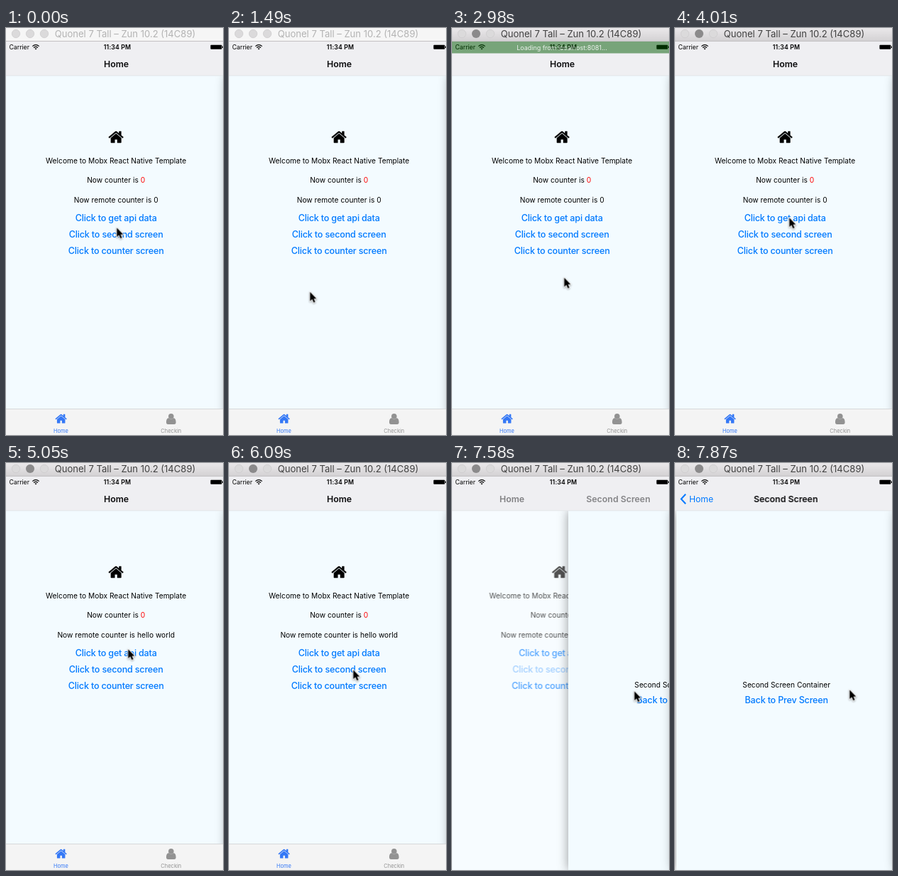
An HTML page that plays this animation: 306 by 571 pixels, repeating every 8000 ms.

```html
<!DOCTYPE html>
<html lang="en">
<head>
<meta charset="utf-8">
<title>Simulator demo</title>
<style>
html, body { margin: 0; width: 100%; height: 100%; overflow: hidden; background: #fefefe; }
svg { display: block; width: 100vw; height: 100vh; }
text { font-family: Inter, Roboto, "Liberation Sans", sans-serif; white-space: pre; }
.mid { text-anchor: middle; }
.body { font-size: 10.2px; letter-spacing: .002em; }
.link { font-size: 12.55px; font-weight: 500; letter-spacing: -.014em; fill: #007aff; }
.title { font-size: 12.35px; font-weight: 600; fill: #0b0b0d; }
.small { font-size: 8.7px; }
.tab { font-size: 7.4px; letter-spacing: .01em; }
.card { fill: #f3fbff; filter: drop-shadow(0 0 7.4px rgba(0, 0, 0, .4)); }
.arrow { filter: drop-shadow(0 1px 1px rgba(0, 0, 0, .35)); }

/* every change is a hard cut on a shared 8 s clock */
.a { animation: 8s step-end infinite; }
.window { animation-name: window; }
.focused { animation-name: focused; }
.app { animation-name: app; }
.banner { animation-name: banner; }
.reply0 { animation-name: reply0; }
.reply1 { animation-name: reply1; }
.press1 { animation-name: press1; }
.press2 { animation-name: press2; }
.home { animation-name: home; }
.second { animation-name: second; }
.tabs { animation-name: tabs; }
.home-title { animation-name: homeTitle; }
.second-title { animation-name: secondTitle; }
.back { animation-name: back; }
.cursor { animation-name: cursor; }

@keyframes window { 0% { color: #b3b3b3 } 22.36% { color: #414141 } }
@keyframes focused { 0% { opacity: 0 } 22.36% { opacity: 1 } }
@keyframes app { 0% { opacity: 1 } 29.74% { opacity: 0 } 35.36% { opacity: 1 } }
@keyframes banner { 0% { opacity: 0 } 29.74% { opacity: 1 } 37.2% { opacity: .5 } 39% { opacity: 0 } }
@keyframes reply0 { 0% { opacity: 1 } 61.36% { opacity: 0 } }
@keyframes reply1 { 0% { opacity: 0 } 61.36% { opacity: 1 } }
@keyframes press1 { 0% { opacity: 1 } 57.6% { opacity: .2 } 59.5% { opacity: .5 } 61.36% { opacity: .9 } 63.1% { opacity: 1 } }
@keyframes press2 { 0% { opacity: 1 } 92.86% { opacity: .2 } 94.74% { opacity: .5 } 96.6% { opacity: .9 } }
@keyframes home {
  0% { transform: none; opacity: 1 }
  94.74% { transform: translateX(-3.5px); opacity: .68 }
  96.6% { transform: translateX(-6.8px); opacity: .36 }
  98.36% { transform: translateX(-7.3px); opacity: .3 }
}
@keyframes second {
  0% { transform: translateX(340px) }
  94.74% { transform: translateX(164px) }
  96.6% { transform: translateX(25px) }
  98.36% { transform: translateX(2px) }
}
@keyframes tabs { 0% { opacity: 1 } 94.74% { opacity: 0 } }
@keyframes homeTitle {
  0% { transform: none; opacity: 1 }
  94.74% { transform: translateX(-71px); opacity: .48 }
  96.6% { transform: translateX(-140px); opacity: .08 }
  98.36% { transform: translateX(-152px); opacity: 0 }
}
@keyframes secondTitle {
  0% { transform: translateX(153px); opacity: 0 }
  94.74% { transform: translateX(79px); opacity: .46 }
  96.6% { transform: translateX(12px); opacity: .92 }
  98.36% { transform: translateX(.7px); opacity: 1 }
}
@keyframes back { 0% { opacity: 0 } 96.6% { opacity: .8 } 98.36% { opacity: 1 } }
@keyframes cursor {
  0% { transform: translate(156px, 280px) }
  1.87% { transform: translate(153px, 277px) }
  3.75% { transform: translate(152px, 275px) }
  13.12% { transform: translate(146px, 293px) }
  14.9% { transform: translate(130px, 330px) }
  16.74% { transform: translate(117px, 361px) }
  18.6% { transform: translate(114px, 370px) }
  22.36% { transform: translate(122px, 375px) }
  24.1% { transform: translate(149px, 390px) }
  26% { transform: translate(166px, 399px) }
  33.5% { transform: translate(166px, 391px) }
  35.36% { transform: translate(163px, 373px) }
  37.2% { transform: translate(158px, 350px) }
  39% { transform: translate(152px, 328px) }
  40.86% { transform: translate(145px, 308px) }
  42.74% { transform: translate(138px, 292px) }
  44.6% { transform: translate(132px, 280px) }
  46.5% { transform: translate(128px, 275px) }
  48.36% { transform: translate(149px, 269px) }
  50.1% { transform: translate(161px, 266px) }
  63.1% { transform: translate(172px, 261px) }
  65% { transform: translate(193px, 250px) }
  66.86% { transform: translate(205px, 244px) }
  70.5% { transform: translate(201px, 251px) }
  72.36% { transform: translate(189px, 270px) }
  74.24% { transform: translate(178px, 285px) }
  76.1% { transform: translate(175px, 290px) }
  94.74% { transform: translate(257px, 320px) }
  96.6% { transform: translate(253px, 320px) }
  98.36% { transform: translate(246px, 318px) }
}
</style>
</head>
<body>
<svg viewBox="0 0 306 571">
  <defs>
    <linearGradient id="chrome" x2="0" y2="1">
      <stop stop-color="#eae8ea"/><stop offset="1" stop-color="#d3d1d3"/>
    </linearGradient>
    <path id="house" d="M14.7 9.9v4.8q0 .6-.6.6h-3.9v-3.8H7.7v3.8H3.8q-.6 0-.6-.6V9.9L8.95 5.15z
      M16.9 9.2l-.6.8q-.2.2-.5.05L8.96 4.3 2 10.05q-.3.2-.5-.05l-.6-.8q-.15-.25.05-.45l7.2-6q.75-.5 1.5 0l2.45 2.05V2.85q0-.3.3-.3h1.95q.3 0 .3.3v4.1l2.2 1.8q.2.2.05.45z"/>
  </defs>

  <rect width="306" height="571" fill="#fefefe"/>

  <g class="a app">
    <g class="a home">
      <rect y="67" width="320" height="504" fill="#f3fbff"/>
      <use href="#house" transform="translate(143.5 141.4) scale(1.303)"/>
      <g class="body mid">
        <text x="155.2" y="189.6">Welcome to Mobx React Native Template</text>
        <text x="155.2" y="217.4">Now counter is <tspan fill="#f00">0</tspan></text>
        <text class="a reply0" x="155.2" y="245.1">Now remote counter is 0</text>
        <text class="a reply1" x="155.2" y="245.1">Now remote counter is hello world</text>
      </g>
      <g class="link mid">
        <text class="a press1" x="155.2" y="271.2">Click to get api data</text>
        <text class="a press2" x="155.2" y="294">Click to second screen</text>
        <text x="155.2" y="316.8">Click to counter screen</text>
      </g>
    </g>

    <g class="a second">
      <rect class="card" y="67" width="306" height="504"/>
      <text class="body mid" x="155.2" y="315">Second Screen Container</text>
      <text class="link mid" x="155.2" y="337.4">Back to Prev Screen</text>
    </g>

    <!-- off-stage neighbour that only shows its shadow -->
    <rect class="card" x="311" y="67" width="306" height="504"/>

    <g class="a tabs">
      <rect y="534" width="306" height="37" fill="#f4f4f4"/>
      <rect y="534" width="306" height="1" fill="#d6d8d9"/>
      <g class="mid" fill="#3478f6">
        <use href="#house" transform="translate(68.7 539.2)"/>
        <text class="tab" x="77.5" y="568.2">Home</text>
      </g>
      <g class="mid" fill="#929292">
        <circle cx="232.8" cy="544.7" r="3.8"/>
        <path d="M226 553.3c0-3.5 1-6 3.4-6q3.4 2.4 6.8 0c2.4 0 3.4 2.5 3.4 6q0 2.6-2.5 2.6h-8.6q-2.5 0-2.5-2.6z"/>
        <text class="tab" x="232.8" y="568.2">Checkin</text>
      </g>
    </g>

    <rect y="18" width="306" height="49" fill="#efeff2"/>
    <rect y="66.5" width="306" height=".8" fill="#e0e3e6"/>
    <text class="title mid a home-title" x="155.5" y="55">Home</text>
    <text class="title mid a second-title" x="155.5" y="55">Second Screen</text>
    <g class="a back">
      <path d="M15 43.8l-6.3 6.7 6.3 6.7" fill="none" stroke="#007aff" stroke-width="2"/>
      <text x="20" y="55" font-size="12.2" fill="#007aff">Home</text>
    </g>

    <text class="small" x="4.5" y="30">Carrier</text>
    <path d="M37.3 25.6q4.7-4 9.4 0M39 27.6q3-2.5 6 0" fill="none" stroke="#000" stroke-width="1.2"/>
    <path d="M40.5 28.8q1.5-1.2 3 0L42 30.4z"/>
    <text class="small mid" x="157" y="30" font-weight="600" letter-spacing=".15">11:34 PM</text>
    <rect x="288.4" y="23.8" width="16" height="6" rx="1"/>
    <rect x="305" y="25.6" width="1" height="2.4"/>
  </g>

  <g class="a banner">
    <rect y="19" width="306" height="16.5" fill="#005a00"/>
    <text class="mid" x="155" y="30.6" font-size="8.95" fill="#e9f3e9">Loading from localhost:8081...</text>
  </g>

  <g class="a window">
    <rect width="306" height="18.5" fill="#f6f6f6"/>
    <rect class="a focused" width="306" height="18.5" fill="url(#chrome)"/>
    <rect y="18" width="306" height="1" fill="#c3c1c3"/>
    <g fill="#dbdadb" stroke="#cdcccd" stroke-width=".8">
      <circle cx="14" cy="8" r="5.7"/>
      <circle cx="34" cy="8" r="5.7"/>
      <circle cx="54" cy="8" r="5.7"/>
    </g>
    <circle class="a focused" cx="34" cy="8" r="6" fill="#8b8a8b"/>
    <text class="mid" x="168" y="13.2" font-size="13.05" fill="currentColor">Quonel 7 Tall – Zun 10.2 (14C89)</text>
  </g>

  <g class="a cursor">
    <path class="arrow" transform="translate(.2 .2) scale(.92)" d="M0 0v14.2l3.3-3 2.3 5.1 2.4-1.1-2.2-4.9H10z" stroke="#fff" stroke-width="2" stroke-linejoin="round" paint-order="stroke"/>
  </g>
</svg>
</body>
</html>
```
